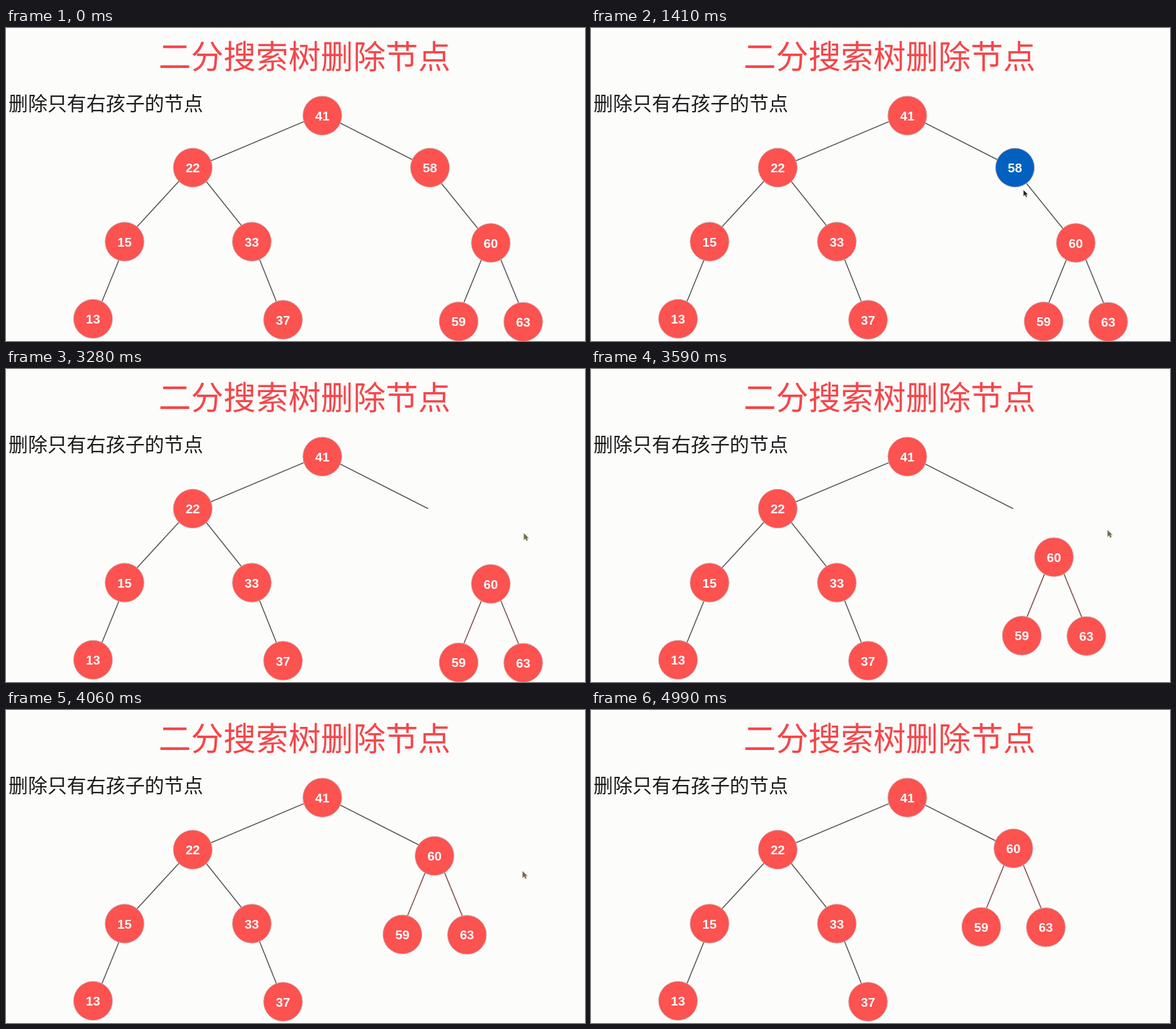
An HTML page for the animation above (5160 ms loop, 928x501 px).

```html
<!DOCTYPE html>
<html lang="zh-CN">
<head>
<meta charset="utf-8">
<style>
  html, body { margin: 0; width: 100%; height: 100%; overflow: hidden; background: #fcfcfa; }
  svg { display: block; }
  .cjk { font-family: "Noto Sans CJK SC", "Noto Sans CJK", sans-serif; }
  .num { font: bold 20.5px "Liberation Sans", Arial, sans-serif; fill: #fff; text-anchor: middle; }
  .link { stroke: #555; stroke-width: 1.6; }
  .disc { fill: #fc5250; stroke: #cfaeac; stroke-width: 1; }
</style>
</head>
<body>
<svg width="928" height="501" viewBox="0 0 928 501">
  <defs>
    <linearGradient id="fade" gradientUnits="userSpaceOnUse" x1="0" y1="0" x2="0" y2="20">
      <stop offset="0" stop-color="#000"/>
      <stop offset="1" stop-color="#fff"/>
    </linearGradient>
    <mask id="wipe" maskUnits="userSpaceOnUse" x="0" y="0" width="928" height="501">
      <rect width="928" height="501" fill="url(#fade)"/>
    </mask>
  </defs>
  <text class="cjk" x="244.5" y="65" font-size="52" fill="#f5464a">二分搜索树删除节点</text>
  <text class="cjk" x="4" y="131.6" font-size="31.2" fill="#1c1c1c">删除只有右孩子的节点</text>
  <g id="fixed"></g>
  <g id="removed" mask="url(#wipe)"></g>
  <g id="subtree"></g>
  <path id="cursor" d="M0 0V10.5L2.5 8.3L4.3 12L6.2 11.2L4.6 7.6H7.6Z" stroke-width=".7"/>
</svg>
<script>
// All timing is counted in steps of the stop-motion clock.
const LOOP = 5160, STEPS = 33;
const BLUE_AT = 4, WIPE_AT = 16, TINT_AT = 21, RISE_AT = 21.6, RISE_STEPS = 6.15;
const POINTER_ON = 5, POINTER_OFF = 28;
const POINTER = [[5, 820, 385], [9, 693, 259], [12, 716, 436], [16, 755, 277], [21, 830, 263], [23, 828, 258]];

// Each row: value, x, y, parent, sideways shift of the link, lift of its upper end.
const TREE = {
  fixed: [
    [41, 507, 140.2], [22, 299.3, 223.5, 41, 3, 4], [15, 190, 342, 22, -2],
    [33, 394, 342, 22, 4], [13, 139.5, 465.5, 15, 3], [37, 444, 467, 33, 1]
  ],
  removed: [[58, 679.5, 223.5, 41, -3, 4]],
  subtree: [[60, 777, 344, 58, -2], [59, 725.5, 469.7, 60, -4], [63, 829, 470.3, 60, 5]]
};

const $ = id => document.getElementById(id);
const clamp = v => Math.min(1, Math.max(0, v));

function add(parent, tag, attrs, text = '') {
  const el = document.createElementNS('http://www.w3.org/2000/svg', tag);
  for (const k in attrs) el.setAttribute(k, attrs[k]);
  el.textContent = text;
  parent.append(el);
  return el;
}

// The link above the removed node stays; the one below it goes away with it.
const linkGroup = { 58: 'fixed', 60: 'removed' };
const spots = {};
for (const group in TREE) {
  for (const [value, x, y, parent, shift, lift = 0] of TREE[group]) {
    spots[value] = { x, y };
    if (!parent) continue;
    const from = spots[parent], layer = $(linkGroup[value] || group);
    layer.prepend(add(layer, 'line', {
      class: 'link', x1: from.x + shift, y1: from.y - lift, x2: x + shift, y2: y
    }));
  }
}
for (const group in TREE) {
  for (const [value, x, y] of TREE[group]) {
    add($(group), 'circle', { class: 'disc', cx: x, cy: y, r: 31.2 });
    add($(group), 'text', { class: 'num', x, y: y + 7.5 }, value);
  }
}

const doomed = $('removed').querySelector('circle');
const subLinks = $('subtree').querySelectorAll('line');
const cursor = $('cursor');

function pointerAt(step) {
  const i = POINTER.findIndex(p => p[0] > step);
  const b = POINTER.at(i), a = i > 0 ? POINTER[i - 1] : b;
  const k = a === b ? 0 : (step - a[0]) / (b[0] - a[0]);
  return [1, 2].map(j => a[j] + (b[j] - a[j]) * k);
}

function draw(time) {
  const step = Math.min(STEPS - 1, Math.floor(time * STEPS / LOOP + .15));
  const rise = Math.sin(clamp((step - RISE_AT) / RISE_STEPS) * Math.PI / 2);
  const edge = 222 + 26 * (step - WIPE_AT);
  const tinted = step >= TINT_AT;

  doomed.style.fill = step >= BLUE_AT ? '#0260c0' : '';
  $('fade').setAttribute('gradientTransform', `translate(0 ${edge})`);
  $('subtree').setAttribute('transform', `translate(${-100 * rise} ${-122.5 * rise})`);
  subLinks.forEach(l => l.style.stroke = tinted ? '#7d4f4c' : '');

  cursor.style.display = step >= POINTER_ON && step < POINTER_OFF ? '' : 'none';
  cursor.setAttribute('transform', `translate(${pointerAt(step)})`);
  cursor.setAttribute('fill', tinted ? '#5c754a' : '#222');
  cursor.setAttribute('stroke', tinted ? '#c48a78' : '#ddd');
}

const start = performance.now();
function tick() {
  draw((performance.now() - start) % LOOP);
  requestAnimationFrame(tick);
}
tick();
</script>
</body>
</html>
```
